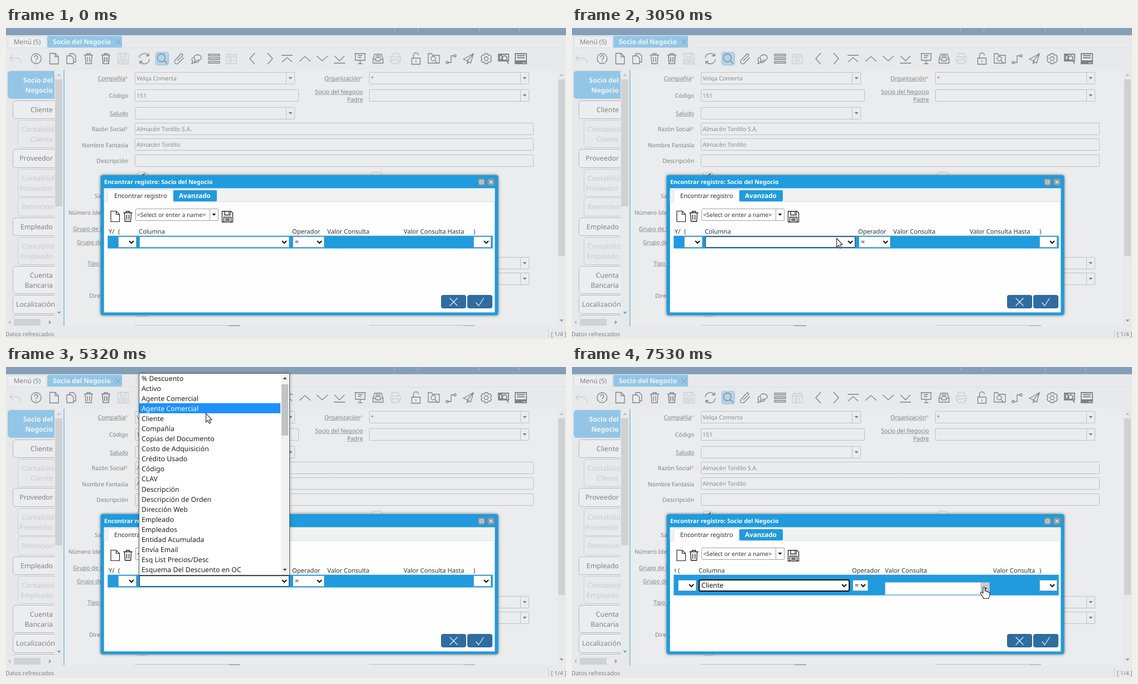
These frames come from a looping animation (1004 px wide and 558 px high, 8000 ms). An HTML page with a canvas:

```html
<!DOCTYPE html>
<html lang="es">
<head>
<meta charset="utf-8">
<title>Encontrar registro</title>
<style>
html, body { margin: 0; width: 100%; height: 100%; overflow: hidden; background: #eaeced; }
canvas { display: block; width: 1004px; height: 558px; }
</style>
</head>
<body>
<canvas id="stage" width="1004" height="558"></canvas>
<script>
const ctx = document.getElementById('stage').getContext('2d');
const LOOP = 8000;
const FONT = '"Noto Sans", "Open Sans", sans-serif';
const BLUE = '#1f9bde', PALE_BLUE = '#93c6e6', NAVY = '#2f6da1';
const PAGE = '#eaeced', BAR = '#e7e9eb', INK = '#7d8285', EDGE = '#bdc1c3', FAINT = '#cbcfd1';

// ---------- helpers ----------
function rect(x, y, w, h, fill) {
  ctx.fillStyle = fill;
  ctx.fillRect(x, y, w, h);
}

function box(x, y, w, h, fill, stroke, r = 0, line = 1) {
  const inset = stroke ? .5 : 0;
  ctx.beginPath();
  ctx.roundRect(x + inset, y + inset, w - 2 * inset, h - 2 * inset, r);
  if (fill) { ctx.fillStyle = fill; ctx.fill(); }
  if (stroke) { ctx.strokeStyle = stroke; ctx.lineWidth = line; ctx.stroke(); }
}

// y is the visual middle of the line
function text(str, x, y, size, color, { bold = false, align = 'left' } = {}) {
  ctx.font = `${bold ? 'bold ' : ''}${size}px ${FONT}`;
  ctx.textAlign = align;
  ctx.fillStyle = color;
  ctx.fillText(str, x, y + size * .36);
  return ctx.measureText(str).width;
}

function shape(d, x, y, stroke, line = 1.3, fill) {
  const path = new Path2D(d);
  ctx.save();
  ctx.translate(x, y);
  if (fill) { ctx.fillStyle = fill; ctx.fill(path); }
  if (stroke) { ctx.strokeStyle = stroke; ctx.lineWidth = line; ctx.stroke(path); }
  ctx.restore();
}

function clipped(x, y, w, h, draw) {
  ctx.save();
  ctx.beginPath();
  ctx.rect(x, y, w, h);
  ctx.clip();
  draw();
  ctx.restore();
}

function shadowed(color, blur, draw) {
  ctx.save();
  ctx.shadowColor = color;
  ctx.shadowBlur = blur;
  draw();
  ctx.restore();
}

const TRI = {
  up: 'M-3.5 2L0-2L3.5 2Z', down: 'M-3.5-2L0 2L3.5-2Z',
  left: 'M2-3.5L-2 0L2 3.5Z', right: 'M-2-3.5L2 0L-2 3.5Z'
};
const tri = (dir, x, y, color) => shape(TRI[dir], x, y, null, 1, color);

// ---------- icons ----------
const ICON = {
  undo: 'M-4-7L-10-1L-4 5M-10-1H3Q9-1 10 8',
  help: 'M-9 0a9 9 0 1 0 18 0a9 9 0 1 0-18 0M-3-2.5a3 3 0 1 1 4.5 2.6q-1.5 1-1.5 2.4M0 4.5v1.8',
  page: 'M-7.5-9.5H2L8-3.5V9.5H-7.5ZM2-9.5V-3.5H8',
  copy: 'M-8-5H0L4-1V9H-8ZM-3-5V-9H4L8-5V6H4',
  trash: 'M-8-6.5H8M-3-6.5V-9H3V-6.5M-6-6.5L-5 9H5L6-6.5M-2-3V6M2-3V6',
  save: 'M-9.5-9.5H6.5L9.5-6.5V9.5H-9.5ZM-5-9.5V-3H5V-9.5M2.5-8V-5M-6.5 9.5V1H6.5V9.5M-4 4H4M-4 6.5H4',
  refresh: 'M-9-1A9 9 0 0 1 7-6M9 1A9 9 0 0 1-7 6M8-9.5V-5H3M-8 9.5V5H-3',
  find: 'M-8.5-1.5a7 7 0 1 0 14 0a7 7 0 1 0-14 0M3.5 3.5L9 9',
  clip: 'M-4 4L5-5a2 2 0 0 0-3-3L-8 3a3.8 3.8 0 0 0 6 5L8-2',
  chat: 'M-3 1.5A6.5 5 0 1 1 1 3L-4 6ZM-6-2.5A5 4.5 0 0 0-7 5L-9 9L-4 7Q1 8 4 4',
  lines: 'M-10-8H10v3H-10ZM-10-1.5H10v3H-10ZM-10 5H10v3H-10Z',
  date: 'M-9-7H9V9H-9ZM-9-3H9M-5-10V-6M5-10V-6M-4 0H0V3H-4V6H0M4 0V6',
  prev: 'M4-10L-5 0L4 10',
  next: 'M-4-10L5 0L-4 10',
  first: 'M-10-6H10M-9 6L0-2L9 6',
  up: 'M-10 5L0-4L10 5',
  down: 'M-10-5L0 4L10-5',
  last: 'M-10 8H10M-9-5L0 4L9-5',
  screen: 'M-10-9H10M-8.5-9V3H8.5V-9M0 3V9M-4 9H4M-4-5.5H4M-4-2H2',
  inbox: 'M-9 1L-6-8H6L9 1V8H-9ZM-9 1H-4V4H4V1H9M-4-5H4M-5-2H5',
  print: 'M-6-3V-9H6V-3M-6 5H-9V-3H9V5H6M-6 2H6V9H-6Z',
  lock: 'M-7.5-1H7.5V10H-7.5ZM-4.5-1V-6a4.5 4.5 0 0 1 9 0M0 3V6.5',
  folder: 'M-10 8V-9H-4L-2-6H10V8ZM-5 0a4 4 0 1 0 8 0a4 4 0 1 0-8 0M2 3L7 9',
  flow: 'M-9 7a2 2 0 1 0 4 0a2 2 0 1 0-4 0M-5 7H0V-5H5M5-5a2 2 0 1 0 4 0a2 2 0 1 0-4 0',
  send: 'M-9 1L9-9L4 8L-2 4ZM9-9L-2 4V9L1 6',
  gear: 'M-2.5-9h5l1 3 3-1 3 4-2 3 2 3-3 4-3-1-1 3h-5l-1-3-3 1-3-4 2-3-2-3 3-4 3 1zM-3.5 0a3.5 3.5 0 1 0 7 0a3.5 3.5 0 1 0-7 0',
  scan: 'M-9-8H9V4H-9ZM-7-6H-3V2H-7ZM-2-1a4 4 0 1 0 8 0a4 4 0 1 0-8 0M5 2L9 9',
  form: 'M-10-9H10V9H-10ZM-7-5.5H7M-7-1.5H7M-10 4H10M-10 6H10M-10 8H3'
};
const TOOLS = Object.entries({
  undo: 17, help: 54, page: 86, copy: 117, trash: 148, save: 210, refresh: 248, find: 280,
  clip: 311, chat: 342, lines: 373, date: 404, prev: 442, next: 473, first: 504, up: 536,
  down: 567, last: 598, screen: 635, inbox: 667, print: 698, lock: 735, folder: 767,
  flow: 798, send: 829, gear: 861, scan: 892, form: 923
});
const DISABLED = ['undo', 'save', 'date', 'print'];
const HEAVY = ['scan', 'form'];

// ---------- dimmed window ----------
function drawHeader() {
  rect(0, 0, 1004, 13, '#869fb8');
  for (const x of [696, 738, 848, 920]) rect(x, 0, 1, 6, '#b4c1ce');
  rect(0, 13, 1004, 62, BAR);
  box(3, 15, 70, 21, '#eceeef', '#d9dcde', 2);
  text('Menú (5)', 14, 25, 11.7, INK);
  box(74, 14, 134, 21, PALE_BLUE, null, 2);
  text('Socio del Negocio', 84, 25, 11.9, '#f1f4f6', { bold: true });
  shape('M-5-5L5 5M5-5L-5 5', 201, 25, '#84959f', 1);
  rect(0, 35, 1004, 1, '#dcdfe1');
  box(268, 43, 24, 24, '#b3d4e8', '#93c2e0', 3);
  for (const [name, x] of TOOLS)
    shape(ICON[name], x, 55, DISABLED.includes(name) ? FAINT : INK, HEAVY.includes(name) ? 1.8 : 1.3);
  shape(ICON.trash, 179, 55, INK, 1.7);
}

const SIDE = [
  [3, 77, 50, 'Socio del', 'Negocio'], [12, 130, 33, 'Cliente'],
  [21, 165, 50, 'Contabilidad', 'Cliente'], [12, 217, 34, 'Proveedor'],
  [21, 253, 50, 'Contabilidad', 'Proveedor'], [21, 304, 34, 'Retenciones'],
  [12, 340, 33, 'Empleado'], [21, 375, 50, 'Contabilidad', 'Empleado'],
  [12, 427, 50, 'Cuenta', 'Bancaria'], [12, 479, 34, 'Localización'], [12, 515, 34, '']
];

function drawSide() {
  rect(0, 75, 103, 460, '#e6e8ea');
  clipped(0, 75, 87, 443, () => {
    for (const [x, y, h, ...lines] of SIDE) {
      const active = x === 3, sub = x === 21;
      box(x, y, 100, h, active ? PALE_BLUE : sub ? '#e7e9eb' : '#ecedee',
        active ? PALE_BLUE : sub ? '#c9cdcf' : '#b5babd', 5);
      const color = active ? '#f1f4f6' : sub ? '#c8ccce' : INK;
      lines.forEach((str, i) => {
        const mid = y + h / 2 + (lines.length > 1 ? i * 17.5 - 8 : 0);
        const long = str.length > 9;
        const left = x === 12 ? 18 : 28;
        text(str, long ? left : 84, mid, active ? 12.1 : 12.3, color, { bold: active, align: long ? 'left' : 'right' });
      });
    }
  });
  rect(87, 75, 15, 443, '#e7e9ea');
  rect(88, 92, 13, 228, '#cfd1d3');
  tri('up', 95, 84, '#b9bdbf');
  tri('down', 95, 511, '#94999c');
  rect(0, 520, 87, 15, '#e7e9ea');
  rect(14, 522, 48, 12, '#cfd1d3');
  tri('left', 6, 528, '#b9bdbf');
  tri('right', 79, 528, '#94999c');
  rect(103, 75, 2, 460, PALE_BLUE);
}

function label(str, x, y, { link = false, star = false, align = 'right' } = {}) {
  const right = star ? x - 5 : x;
  const w = text(str, right, y, 10.3, INK, { align });
  if (link) rect(align === 'right' ? right - w : right, Math.round(y) + 5, w, 1, '#a2a7aa');
  if (star) text('*', x, y, 10.3, '#d8a98a', { align: 'right' });
}

function field(x, y, w, value = '', combo = false) {
  box(x, y, w, 22, PAGE, EDGE, 1);
  if (combo) {
    box(x + w - 16, y, 16, 22, PAGE, EDGE, 1);
    tri('down', x + w - 8, y + 11, '#7a8083');
  }
  text(value, x + 3, y + 11.5, 10.4, '#888d90');
}

function drawForm() {
  rect(105, 75, 883, 460, PAGE);
  label('Compañía', 219, 90, { link: true, star: true });
  label('Organización', 640, 90, { link: true, star: true });
  label('Código', 219, 121.5);
  label('Socio del Negocio', 640, 114, { link: true });
  label('Padre', 640, 128, { link: true });
  label('Saludo', 219, 153, { link: true });
  label('Razón Social', 219, 181.5, { star: true });
  label('Nombre Fantasía', 219, 210);
  label('Descripción', 219, 238.5);
  field(231, 79, 287, 'Velqa Comerta', true);
  field(651, 79, 287, '*', true);
  field(231, 110, 294, '151');
  field(651, 110, 287, '', true);
  field(231, 142, 287, '', true);
  field(231, 170, 715, 'Almacén Tordilo S.A.');
  field(231, 198, 715, 'Almacén Tordilo');
  field(231, 227, 715);
  box(235, 258, 18, 18, PAGE, EDGE, 2);
  box(655, 258, 19, 18, PAGE, EDGE, 2);
  shape('M-4 4L5-3', 244, 264, '#666', 2);
  const left = { align: 'left' }, linked = { align: 'left', link: true };
  label('Saldo', 159, 301, left);
  label('Número Identificación', 112, 331, left);
  label('Grupo de Empresa', 120, 360, linked);
  label('Grupo de Cobro', 127, 384, linked);
  label('Tipo de', 146, 422, linked);
  label('Dirección', 149, 480, left);
  field(651, 411, 287, '', true);
  field(651, 439, 287, '', true);
  box(235, 500, 18, 18, PAGE, EDGE, 2);
  rect(231, 533, 189, 1, EDGE);
  rect(651, 533, 190, 1, EDGE);
  rect(399, 533, 21, 2, '#9bb0bd');
  rect(820, 533, 21, 2, EDGE);

  rect(988, 75, 16, 460, '#e7e9ea');
  rect(990, 92, 12, 317, '#cfd1d3');
  tri('up', 996, 84, '#b9bdbf');
  tri('down', 996, 525, '#94999c');
  rect(0, 535, 1004, 23, BAR);
  text('Datos refrescados', -1, 549, 10.3, INK);
  rect(972, 541, 1, 15, FAINT);
  text('[ 1/4 ]', 977, 549, 10.3, INK);
}

// ---------- dialog ----------
function select(x, y, w, value = '', state = 'normal') {
  const focus = state === 'focus';
  if (focus) box(x - .5, y - .5, w + 1, 21, '#fff', '#101010', 2.5, 2);
  else box(x, y, w, 20, '#fff', state === 'hover' ? '#333' : '#86a5b8');
  text(value, x + 4, y + 10, 12.2, '#111');
  shape('M-4-2L0 2L4-2', x + w - 9, y + 10, '#111', 2);
}

function drawDialog(s) {
  shadowed('rgba(0,0,0,.6)', 5, () => box(169.7, 264, 712.6, 251.3, BLUE, null, 4));
  text('Encontrar registro: Socio del Negocio', 176, 276, 10.55, '#fff', { bold: true });
  for (const x of [852, 869]) box(x - 6.5, 269.5, 14, 14, '#8a9ba6', '#6f8796', 4);
  shape('M-3-3H3V3H-3ZM-3 0H3', 852.5, 276.5, '#eef3f6', 1);
  shape('M-2.5-2.5L2.5 2.5M2.5-2.5L-2.5 2.5', 869.5, 276.5, '#eef3f6', 1.3);

  rect(175.7, 287.7, 700.6, 222.6, '#fefefe');
  rect(175.7, 287.7, 700.6, 23.3, '#f0f2f2');
  rect(175.7, 311, 700.6, 1, '#d9dddf');
  box(182, 290, 117, 23, '#fefefe', '#e0e4e6', 2);
  rect(183, 310, 115, 3, '#fefefe');
  box(300, 291, 78, 20, BLUE, null, 2);
  text('Encontrar registro', 194, 301, 11.1, '#333');
  text('Avanzado', 310, 301, 11.7, '#fff', { bold: true });

  shape(ICON.page, 195.5, 338, '#222', 1.2);
  shape(ICON.trash, 218.5, 338, '#222', 1.3);
  box(232, 324, 149, 22, '#fff', '#a0a0a0', 1);
  box(365, 324, 16, 22, '#fff', '#a0a0a0', 1);
  tri('down', 373, 335, '#222');
  text('<Select or enter a name>', 235, 335.5, 10.5, '#333');
  shape(ICON.save, 397, 338.5, '#222', 1.3);

  drawRow(s);

  for (const x of [780, 827]) box(x, 479, 45, 24, NAVY, '#2a6294', 3);
  shape('M-7-7L7 7M7-7L-7 7', 802.5, 491.5, '#eef4f8', 1.2);
  shape('M-7 1L-2 7L7-7', 849.5, 491.5, '#eef4f8', 1.2);
}

function drawRow({ wide, value, state, overButton }) {
  const head = (str, x) => text(str, x, 365, 11.1, '#333');
  const dx = wide ? -11 : 0, y = wide ? 382 : 374;
  clipped(183, 355, wide ? 3 : 12, 18, () => head('Y/O', 184 + dx));
  head('(', 201 + dx);
  head('Columna', 238 + dx);
  head('Operador', 513 + dx);
  head('Valor Consulta', wide ? 561 : 576);
  clipped(700, 355, wide ? 131 : 135, 18, () => head('Valor Consulta' + (wide ? '' : ' Hasta'), wide ? 755 : 713));
  head(')', 838);

  rect(182.3, 372.7, 690.4, wide ? 37 : 22.8, BLUE);
  select(201 + dx, y, 33);
  select(239 + dx, y, 269, value, state);
  select(514 + dx, y, wide ? 28 : 57, '=');
  select(838, y, 32);
  if (wide) {
    box(561, 386, 173, 23, '#fff', '#a9c4d4');
    box(733, 386, 16, 23, overButton ? '#c5ccd1' : '#fff', '#a3b2bb');
    tri('down', 741, 398, '#333');
  }
}

// ---------- dropdown ----------
const ITEMS = ['', '% Descuento', 'Activo', 'Agente Comercial', 'Agente Comercial', 'Cliente', 'Compañía',
  'Copias del Documento', 'Costo de Adquisición', 'Crédito Usado', 'Código', 'CLAV', 'Descripción',
  'Descripción de Orden', 'Dirección Web', 'Empleado', 'Empleados', 'Entidad Acumulada', 'Envía Email',
  'Esq List Precios/Desc', 'Esquema Del Descuento en OC'];
const PITCH = 18.08;

function drawList(scrolled, tipY) {
  shadowed('rgba(0,0,0,.25)', 6, () => box(238, 11, 271, 363, '#fff'));
  clipped(239, 11, 254, 362, () => {
    const top = scrolled ? 11 - PITCH : 9;
    const hot = scrolled ? Math.floor((tipY - top) / PITCH) : -1;
    ITEMS.forEach((str, i) => {
      const y = top + i * PITCH;
      const on = i === hot;
      if (on) rect(239, Math.round(y), 253, 18, '#1e90ff');
      if (y < 355) text(str, 243, y + PITCH / 2 + .2, 12.3, on ? '#fff' : '#222');
    });
  });
  rect(493, 12, 15, 361, '#f2f2f2');
  rect(494, scrolled ? 31 : 27, 12, 92, '#c1c4c6');
  tri('up', 500, 20, '#444');
  tri('down', 500, 364, '#444');
  box(238, 11, 271, 363, null, '#555');
  if (!scrolled) rect(239, 371, 269, 2, BLUE);
}

// ---------- pointer ----------
// start, end, steps, goal x, goal y, easing power
const MOVES = [
  [530, 1080, 8, 520, 397, 2],
  [1540, 1960, 7, 474, 377, 2],
  [3690, 4230, 9, 358, 54, 2],
  [4430, 4840, 6, 358, 50, 2],
  [5040, 5590, 9, 358, 88, 2.5],
  [6590, 6800, 4, 754, 409, 2],
  [7330, 7530, 4, 739, 395, 2]
];

function pointerAt(t) {
  let x = 1131, y = 585;
  for (const [t0, t1, n, gx, gy, pow] of MOVES) {
    if (t < t0) break;
    const step = Math.min(n, Math.floor((t - t0) / (t1 - t0) * (n - 1) + .001) + 1);
    const k = 1 - (1 - step / n) ** pow;
    x += (gx - x) * k;
    y += (gy - y) * k;
  }
  return { x, y };
}

const ARROW = 'M.5.5V16L4 12.7L6.4 18L9 17L6.7 11.7H11Z';
const HAND = 'M-2 1.5a1.7 1.7 0 0 1 3.4 0V7q3-1 3.2 1q3-.6 3 1.2q2.4-.3 2.4 1.8V14q0 3-2 5v1.5H-1.5V19L-6 12q-1.5-2 .5-3Q-4 8.6-2 11Z';

function draw(t) {
  const tip = pointerAt(t);
  const open = t >= 3210 && t < 6150;
  const chosen = t >= 6150, wide = t >= 6320;
  const overSelect = tip.x > 239 && tip.x < 508 && tip.y > 374 && tip.y < 394;
  const overButton = wide && tip.x >= 733 && tip.x < 749 && tip.y > 386 && tip.y < 409;

  drawHeader();
  drawSide();
  drawForm();
  drawDialog({
    wide, overButton,
    value: chosen ? 'Cliente' : '',
    state: chosen ? 'focus' : open || overSelect ? 'hover' : 'normal'
  });
  if (open) drawList(t >= 3755, tip.y);
  shape(overButton ? HAND : ARROW, tip.x, tip.y, '#222', 1.1, '#fff');
}

function tick(now) {
  draw(now % LOOP);
  requestAnimationFrame(tick);
}

ctx.textRendering = 'geometricPrecision';
requestAnimationFrame(tick);
</script>
</body>
</html>
```
